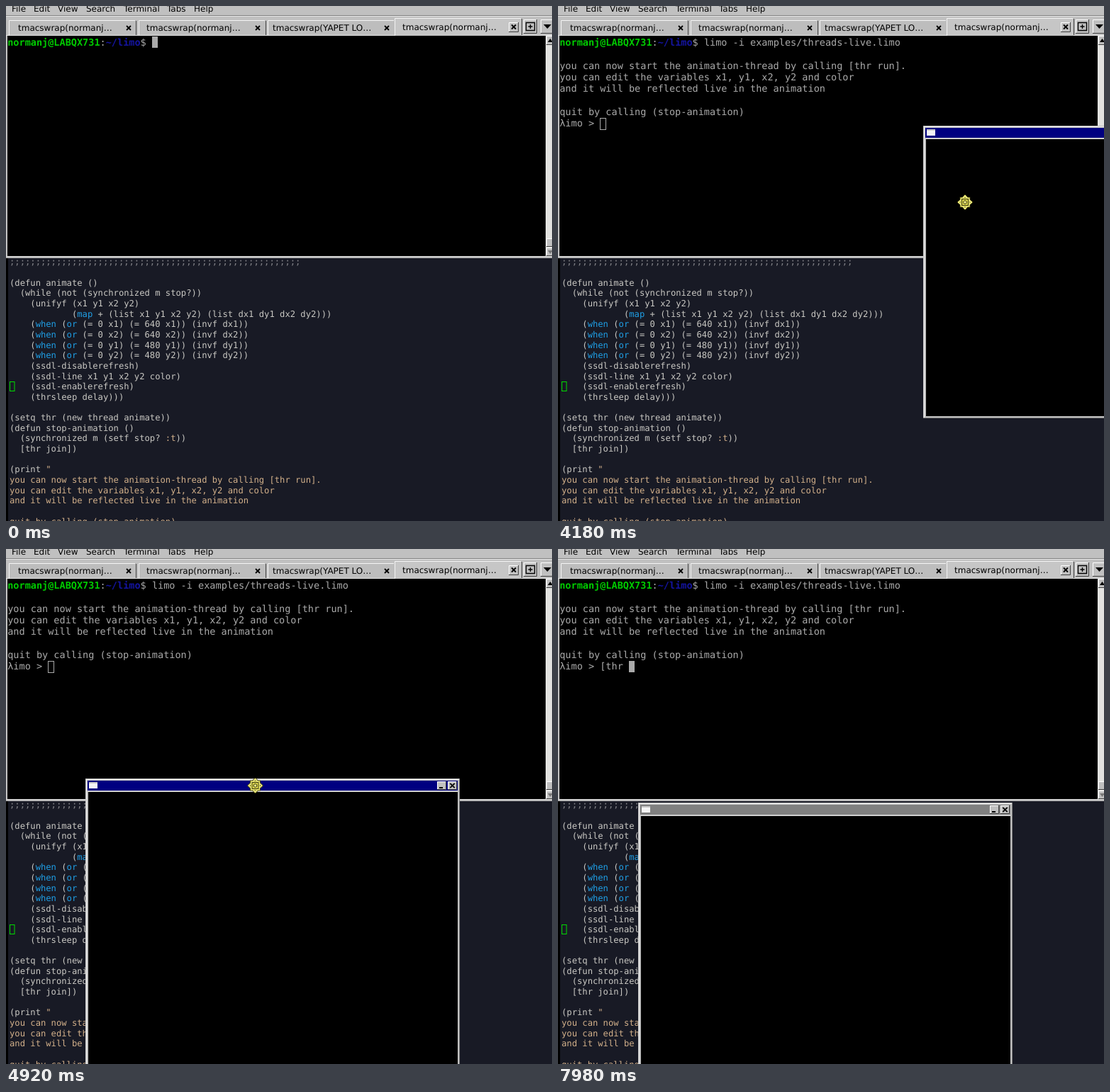
An HTML page that plays this animation: 770 by 727 pixels, repeating every 8 s.

```html
<!DOCTYPE html>
<html lang="en">
<head>
<meta charset="utf-8">
<title>Terminal session</title>
<style>
  html, body { margin: 0; width: 100%; height: 100%; overflow: hidden; background: #000; }
  svg { display: block; width: 770px; height: 727px; }
  text { white-space: pre; text-rendering: geometricPrecision; }
  .ui { font: 12px "DejaVu Sans", sans-serif; fill: #000; }
  .term { font: 13.54px "DejaVu Sans Mono", monospace; fill: #aaa; }
  .code { font: 12.18px "DejaVu Sans Mono", monospace; fill: #c9c8c3; }
  .bold { font-weight: bold; }
</style>
</head>
<body>
<svg id="stage" viewBox="0 0 770 727" xmlns="http://www.w3.org/2000/svg">
  <rect width="770" height="727" fill="#c0c0c0"/>
  <g id="chrome"></g>
  <g id="terminal"></g>
  <g id="editor"></g>
  <g id="window"></g>
  <g id="ibeam" fill="none">
    <path d="M-4-9Q0-9 0-6Q0-9 4-9M0-6V6M-4 9Q0 9 0 6Q0 9 4 9" stroke="#ddd" stroke-width="3"/>
    <path d="M-4-9Q0-9 0-6Q0-9 4-9M0-6V6M-4 9Q0 9 0 6Q0 9 4 9" stroke="#000"/>
  </g>
  <path id="arrow" d="M0 0V16L4 12L7 18L9.500 17L7 11H12Z" fill="#000" stroke="#fff"/>
  <g id="mover" stroke="#3a3810">
    <path d="M0-11L11 0L0 11L-11 0Z" fill="#e9e566"/>
    <rect x="-7" y="-7" width="14" height="14" fill="#e9e566" stroke-width=".8"/>
    <path d="M0-9L9 0L0 9L-9 0Z" fill="none" stroke="#f6f28a" stroke-width="1.200"/>
    <rect x="-4.500" y="-4.500" width="9" height="9" fill="#d8d34c"/>
    <circle r="2.300" fill="#f4f08a"/>
  </g>
</svg>
<script>
const $ = id => document.getElementById(id);
const LOOP = 8000;

const rect = (x, y, w, h, fill, extra = "") =>
  `<rect x="${x}" y="${y}" width="${w}" height="${h}" fill="${fill}" ${extra}/>`;
const path = (d, stroke, width = 1, fill = "none") =>
  `<path d="${d}" stroke="${stroke}" stroke-width="${width}" fill="${fill}"/>`;
const text = (x, y, cls, body, extra = "") =>
  `<text x="${x}" y="${y}" class="${cls}" ${extra}>${body}</text>`;
const span = (fill, body, cls = "") => `<tspan fill="${fill}" class="${cls}">${body}</tspan>`;
const cross = (x, y, r = 3) =>
  path(`M${x - r} ${y - r}L${x + r} ${y + r}M${x + r} ${y - r}L${x - r} ${y + r}`, "#000", 1.8);
const bevel = (x, y, w, h) =>
  rect(x, y, w, h, "#c0c0c0") +
  path(`M${x + .5} ${y + h}V${y + .5}H${x + w}`, "#fff") +
  path(`M${x + w - .5} ${y}V${y + h - .5}H${x}`, "#404040");

// Menu bar, tabs and scroll bar
function drawChrome() {
  const menu = [["File", 8], ["Edit", 39], ["View", 73], ["Search", 113],
                ["Terminal", 166], ["Tabs", 227], ["Help", 265]];
  let out = menu.map(([label, x]) => text(x, 7.5, "ui", label)).join("");
  out += path("M0 13.500H770", "#808080") + path("M0 14.500H770", "#e8e8e8");
  const user = "tmacswrap(normanj…";
  const tabs = [[4, 17, user, 173], [187, 198, user, 355],
                [369, 376, "tmacswrap(YAPET LO…", 537], [548, 559, user, 716]];
  tabs.forEach(([x, tx, label, cx], i) => {
    const active = i === 3, top = active ? 17 : 20;
    out += rect(x, top, 179, 42 - top, active ? "#c6c6c6" : "#bdbdbd") +
      path(`M${x + .5} 42V${top + .5}H${x + 178}`, "#f4f4f4") +
      path(`M${x + 179.5} ${top + 1}V42`, "#404040");
    if (active) out += bevel(709, 23, 14, 14);
    out += text(tx, active ? 33.5 : 35.2, "ui", label) + cross(cx, active ? 29.5 : 31);
  });
  out += bevel(730, 19, 19, 20) +
    path("M733.500 23.500H745.500V34.500H733.500ZM736.500 29H742.500M739.500 26V32", "#000", 1.4) +
    bevel(754, 19, 19, 20) + path("M758 26H769L763.500 32Z", "none", 0, "#000");
  out += path("M0 41.500H548M727 41.500H770", "#e4e4e4");
  out += rect(761, 42, 9, 311, "#e2e2e0") + bevel(762, 42, 10, 13) +
    path("M764 51H771L767.500 46Z", "none", 0, "#000") +
    bevel(762, 328, 10, 12) + bevel(762, 341, 10, 12) +
    path("M764 345H771L767.500 350Z", "none", 0, "#777");
  $("chrome").innerHTML = out;
}

const MESSAGE = [
  "you can now start the animation-thread by calling [thr run].",
  "you can edit the variables x1, y1, x2, y2 and color",
  "and it will be reflected live in the animation",
  "",
  "quit by calling (stop-animation)"];

const COL = 8.151, ROW = 16.36;
const termText = (row, body, extra) => text(2.2, 55.8 + row * ROW, "term", body, extra);

function drawTerminal() {
  const prompt = span("#00cc00", "normanj@LABQX731", "bold") + ":" +
    span("#1414a0", "~/limo", "bold") + "$ ";
  $("terminal").innerHTML = rect(2, 42, 759, 311, "#000") +
    termText(0, `${prompt}<tspan id="command"></tspan>`) +
    `<g id="output">${MESSAGE.map((s, i) => termText(i + 2, s)).join("")}` +
    termText(7, 'λimo &gt; <tspan id="input"></tspan>') + "</g>" +
    '<rect id="caret" stroke="#aaa"/>' +
    rect(0, 353, 770, 1, "#e4e4e4") + rect(0, 354, 770, 2, "#b8b8b8");
}

function drawEditor() {
  const source = [
    "(defun animate ()",
    "  (while (not (synchronized m stop?))",
    "    (unifyf (x1 y1 x2 y2)",
    "            (map + (list x1 y1 x2 y2) (list dx1 dy1 dx2 dy2)))",
    ...[["x1", 640], ["x2", 640], ["y1", 480], ["y2", 480]].map(([v, max]) =>
      `    (when (or (= 0 ${v}) (= ${max} ${v})) (invf d${v}))`),
    "    (ssdl-disablerefresh)",
    "    (ssdl-line x1 y1 x2 y2 color)",
    "    (ssdl-enablerefresh)",
    "    (thrsleep delay)))",
    "",
    "(setq thr (new thread animate))",
    "(defun stop-animation ()",
    "  (synchronized m (setf stop? :t))",
    "  [thr join])",
    "",
    '(print "'];
  const tan = "#d2b08a";
  const paint = s => s
    .replace(/\b(map|when|or)\b/g, m => `<tspan fill="#1f9fe6">${m}</tspan>`)
    .replace(/:t\b/, m => span(tan, m))
    .replace(/"$/, m => span(tan, m));
  const line = (row, body, extra) => text(5, 394.7 + row * 14.65, "code", body, extra);
  $("editor").innerHTML = rect(0, 356, 770, 371, "#181a25") + rect(0, 356, 3, 371, "#000") +
    line(-2, span("#85858a", ";".repeat(56))) +
    source.map((s, i) => line(i, paint(s))).join("") +
    MESSAGE.map((s, i) => line(source.length + i, span(tan, s))).join("") +
    rect(5.5, 530.5, 6.5, 13, "none", 'stroke="#00dc00"');
}

function drawWindow() {
  const button = x => bevel(x, 4, 13, 12);
  $("window").innerHTML = rect(0, 0, 528, 413, "#c0c0c0") +
    path("M1.500 412V1.500H527", "#f0f0f0") + path("M527.500 0V412.500H0", "#808080") +
    '<rect id="title" x="3" y="3" width="522" height="14"/>' +
    rect(3, 17, 522, 2, "#d0d0d0") + rect(4, 19, 521, 391, "#000") +
    rect(5, 5, 12, 9, "#f4f4f4") + rect(5, 5, 12, 2, "#c8c8c8") +
    button(496) + rect(499, 12, 5, 2, "#000") + button(511) + cross(517.5, 10, 3.2);
}

// Keys are [step, x, y]
function track(keys, step) {
  let i = 1;
  while (i < keys.length - 1 && keys[i][0] < step) i++;
  const [s0, x0, y0] = keys[i - 1], [s1, x1, y1] = keys[i];
  const k = Math.min(1, Math.max(0, (step - s0) / (s1 - s0)));
  return [x0 + (x1 - x0) * k, y0 + (y1 - y0) * k];
}
const stepAt = (t, start, count) =>
  Math.max(0, Math.min(count - 1, Math.floor((t - start + 8) / 67.3)));

const DRAG_1 = [[0, 515, 169], [1, 335, 267], [2, 125, 382], [4, 69, 430], [7, 84, 390], [11, 112, 324]];
const GRIP_1 = [[0, 574, 277], [1, 440, 350], [2, 357, 397], [3, 325, 422], [4, 308, 440]];
const DRAG_2 = [[0, 112, 324], [3, 109, 231], [4, 110, 262], [6, 111, 349], [8, 112, 374], [11, 113, 358]];
const TO_TERMINAL = [[0, 595, 529], [4, 470, 400], [6, 404, 310], [9, 495, 248]];
const TO_EDGE = [[0, 478, 235], [1, 616, 229]];
const TO_TITLE = [[0, 767, 188], [4, 754, 179]];

function windowAt(t) {
  if (t < 5260) return track(DRAG_1, stepAt(t, 4180, 12)).map(Math.round);
  return track(DRAG_2, stepAt(t, 5260, 12)).map(Math.round);
}

function pointerAt(t, [wx, wy]) {
  if (t >= 120 && t < 1450) return ["ibeam", ...track(TO_TERMINAL, stepAt(t, 120, 10))];
  if (t >= 3260 && t < 3390) return ["ibeam", ...track(TO_EDGE, stepAt(t, 3260, 2))];
  if (t >= 3650 && t < 4180) return ["arrow", ...track(TO_TITLE, stepAt(t, 3650, 5))];
  if (t >= 4180 && t < 6130) {
    const step = stepAt(t, 4180, 12);
    return ["mover", ...(step < 4 ? track(GRIP_1, step) : [wx + 239.5, wy + 10])];
  }
  if (t >= 6200 && t < 7190) return ["ibeam", 291, 241];
  return ["", 0, 0];
}

function typedAt(t) {
  if (t < 7190) return "";
  return t < 7720 ? "[" : t < 7850 ? "[t" : t < 7975 ? "[thr" : "[thr ";
}

function render(t) {
  const command = t < 1380 ? "" : "limo -i examples/threads-live.limo";
  const typed = typedAt(t), printed = t >= 2510, opened = t >= 2380;
  $("command").textContent = command;
  $("input").textContent = typed;
  $("output").style.display = printed ? "" : "none";

  const [col, row] = printed ? [7 + typed.length, 7] : t >= 2310 ? [0, 1] : [25 + command.length, 0];
  const hollow = opened && t < 6200;
  const caret = { x: Math.round(2 + col * COL) + .5, y: Math.round(43 + row * ROW) + .5,
                  width: hollow ? 8 : 7, height: hollow ? 16 : 15, fill: hollow ? "none" : "#aaa" };
  for (const key in caret) $("caret").setAttribute(key, caret[key]);

  const pos = windowAt(t);
  $("window").style.display = opened ? "" : "none";
  $("window").setAttribute("transform", `translate(${pos})`);
  const blurred = t >= 6130 || (t >= 4990 && t < 5060);
  $("title").setAttribute("fill", blurred ? "#808080" : "#000080");

  const [shape, px, py] = pointerAt(t, pos);
  for (const id of ["ibeam", "arrow", "mover"]) {
    $(id).style.display = id === shape ? "" : "none";
    $(id).setAttribute("transform", `translate(${px} ${py})`);
  }
}

drawChrome();
drawTerminal();
drawEditor();
drawWindow();
const start = performance.now();
function tick() {
  render((performance.now() - start) % LOOP);
  requestAnimationFrame(tick);
}
render(0);
requestAnimationFrame(tick);
</script>
</body>
</html>
```
